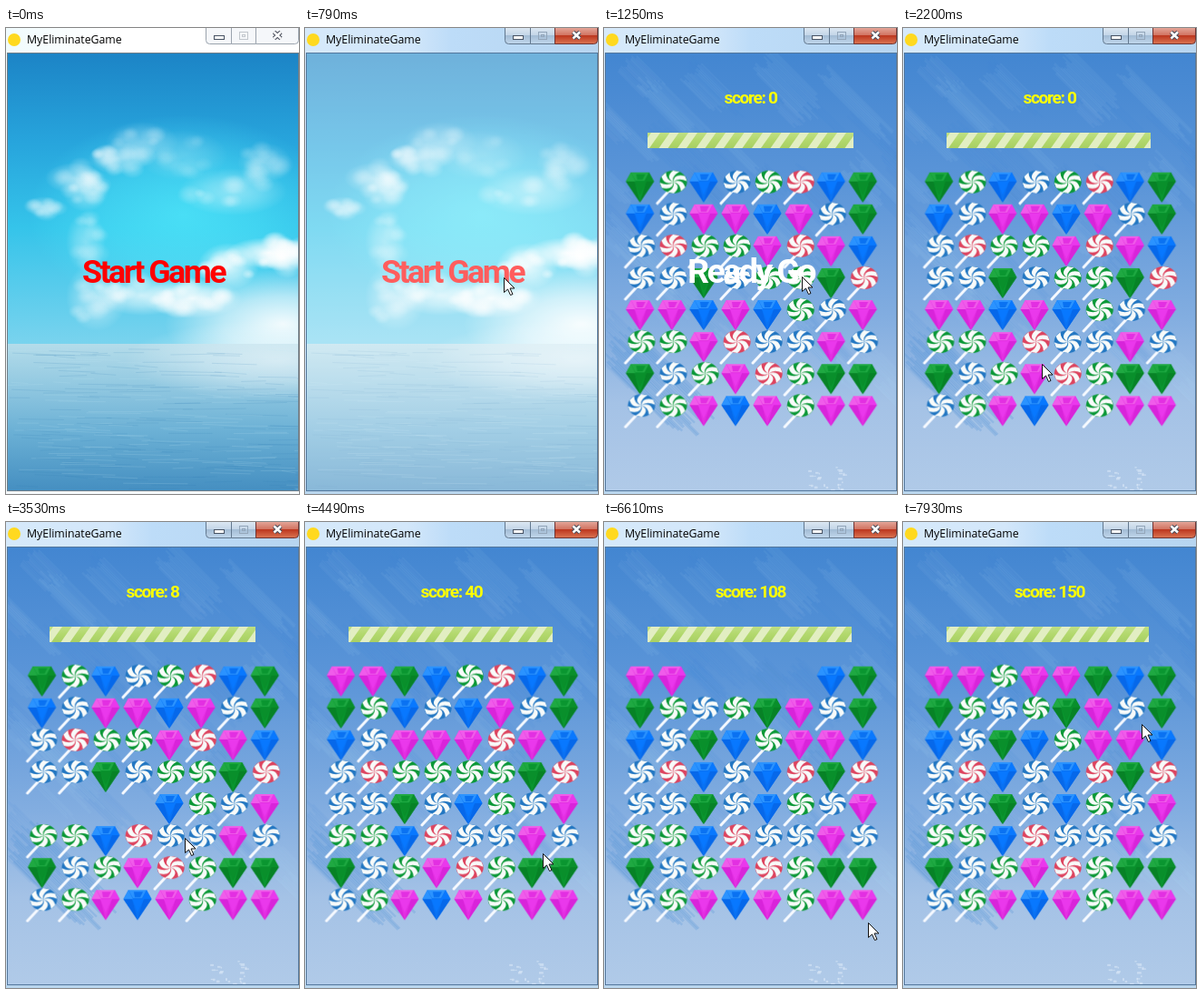
Animation of 323x512 px, one loop 8000 ms. Source, as an HTML page with a canvas:

```html
<!DOCTYPE html>
<html lang="en">
<head>
<meta charset="utf-8">
<title>MyEliminateGame</title>
<style>
html, body { margin: 0; width: 323px; height: 512px; overflow: hidden; }
canvas { display: block; }
</style>
</head>
<body>
<canvas id="stage" width="323" height="512"></canvas>
<script>
const W = 323, H = 512, LOOP = 8000;
const ctx = document.getElementById('stage').getContext('2d');
const clamp = (v, a = 0, b = 1) => Math.min(b, Math.max(a, v));
const part = (t, from, to) => clamp((t - from) / (to - from));
const mix = (a, b, k) => a + (b - a) * k;

function seeded(seed) {
  return () => (seed = (seed * 16807) % 2147483647) / 2147483647;
}

function layer(paint, w = W, h = H) {
  const c = document.createElement('canvas');
  c.width = w;
  c.height = h;
  paint(c.getContext('2d'));
  return c;
}

function shade(g, y0, y1, stops) {
  const fill = g.createLinearGradient(0, y0, 0, y1);
  stops.forEach(([at, color]) => fill.addColorStop(at, color));
  return fill;
}

function poly(g, color, ...pts) {
  g.fillStyle = color;
  g.beginPath();
  for (let i = 0; i < pts.length; i += 2) g.lineTo(pts[i], pts[i + 1]);
  g.closePath();
  g.fill();
}

function glow(g, x, y, rx, ry, alpha, rgb = '255,255,255') {
  g.save();
  g.translate(x, y);
  g.scale(rx, ry);
  const fill = g.createRadialGradient(0, 0, 0, 0, 0, 1);
  fill.addColorStop(0, `rgba(${rgb},${alpha})`);
  fill.addColorStop(0.5, `rgba(${rgb},${alpha * 0.6})`);
  fill.addColorStop(1, `rgba(${rgb},0)`);
  g.fillStyle = fill;
  g.fillRect(-1, -1, 2, 2);
  g.restore();
}

// Scenery
const clouds = [
  [42, 196, 22, 11, 0.4], [75, 165, 32, 17, 0.45], [88, 180, 25, 22, 0.4],
  [125, 143, 34, 18, 0.5], [150, 125, 40, 22, 0.3], [195, 140, 50, 28, 0.2],
  [250, 180, 60, 26, 0.4], [285, 148, 30, 22, 0.3], [88, 235, 22, 34, 0.35],
  [100, 295, 34, 38, 0.5], [150, 294, 50, 22, 0.7], [205, 297, 55, 22, 0.9],
  [245, 262, 34, 26, 0.8], [290, 247, 48, 17, 0.95], [310, 250, 30, 18, 0.8]
];

const sky = layer(g => {
  g.fillStyle = shade(g, 28, 347, [[0, '#1c84c6'], [0.3, '#27a4dc'], [0.6, '#35c4ea'], [1, '#79d3ee']]);
  g.fillRect(2, 28, 320, 320);
  glow(g, 195, 205, 170, 110, 0.75, '80,232,250');
  const rnd = seeded(11);
  clouds.forEach(([x, y, rx, ry, a]) => {
    glow(g, x, y, rx, ry, a);
    for (let i = 0; i < 9; i++) {
      const turn = rnd() * 6.28, far = 0.3 + rnd() * 0.5, size = 5 + rnd() * 8;
      glow(g, x + Math.cos(turn) * rx * far, y + Math.sin(turn) * ry * far, size * 1.3, size, a * 0.6);
    }
  });
  glow(g, 305, 325, 130, 60, 0.9);
  g.fillStyle = shade(g, 347, 508, [[0, '#b4dcea'], [0.25, '#96cbe2'], [0.6, '#6bb0d5'], [1, '#458fc1']]);
  g.fillRect(2, 347, 320, 161);
  glow(g, 300, 365, 170, 45, 0.55);
  g.lineWidth = 1;
  for (let i = 0; i < 240; i++) {
    const y = 350 + 157 * rnd(), x = rnd() * W, w = 15 + rnd() * 60;
    g.strokeStyle = rnd() < 0.5 ? 'rgba(45,120,175,.14)' : 'rgba(190,228,242,.16)';
    g.beginPath();
    g.moveTo(x, y);
    g.lineTo(x + w, y + (rnd() - 0.3) * 4);
    g.stroke();
  }
});

// A dry brush mark: parallel bristles running down to the right
function brush(g, rnd, x, y, len, width, color) {
  g.strokeStyle = color;
  for (let off = 0; off < width; off += 2) {
    const a = (rnd() - 0.5) * len * 0.25, b = len * (0.8 + rnd() * 0.3);
    g.lineWidth = 1.5 + rnd() * 2;
    g.beginPath();
    g.moveTo(x + off * 0.72 + a, y - off * 0.7 + a);
    g.lineTo(x + off * 0.72 + b, y - off * 0.7 + b);
    g.stroke();
  }
}

const meadow = layer(g => {
  g.fillStyle = shade(g, 28, 508, [[0, '#4386d1'], [0.3, '#5b95d8'], [0.6, '#82ade0'], [0.8, '#a4c2e6'], [1, '#b0cae8']]);
  g.fillRect(2, 28, 320, 480);
  const rnd = seeded(29);
  for (let i = 0; i < 45; i++) {
    const color = rnd() < 0.5 ? 'rgba(170,204,240,.07)' : 'rgba(60,125,205,.07)';
    brush(g, rnd, rnd() * 360 - 50, 30 + rnd() * 370, 20 + rnd() * 55, 6 + rnd() * 26, color);
  }
  brush(g, rnd, 0, 365, 85, 50, 'rgba(95,152,216,.3)');
  g.fillStyle = 'rgba(220,234,248,.6)';
  for (let i = 0; i < 26; i++) g.fillRect(225 + rnd() * 40, 482 + rnd() * 25, 1 + rnd() * 4, 1 + rnd() * 2);
});

// Game pieces
const gems = {
  G: ['#0a9630', '#1fa942', '#078226', '#098f2b'],
  B: ['#0a72f2', '#2b93ff', '#0668ea', '#0878ff'],
  P: ['#e32fe2', '#f05cea', '#d824da', '#ea38ec']
};
const candies = { g: '#0b9837', b: '#2377c2', r: '#dd445f' };

function gem(g, [base, light, dark, mid]) {
  poly(g, base, -10, -16, 10, -16, 15.5, -6, 0, 17, -15.5, -6);
  poly(g, light, -10, -16, -5, -6, -15.5, -6);
  poly(g, light, -10, -16, 10, -16, 5, -7, -5, -7);
  poly(g, mid, 10, -16, 15.5, -6, 5, -6);
  poly(g, dark, -15.5, -6, -6, -6, 0, 17);
  poly(g, dark, 15.5, -6, 7, -6, 0, 17);
  poly(g, mid, -6, -6, 7, -6, 0, 9);
  poly(g, base, -4, -14, 6, -14, 3, -8, -3, -8);
}

function candy(g, color) {
  g.strokeStyle = '#f7faff';
  g.lineWidth = 3;
  g.lineCap = 'round';
  g.beginPath();
  g.moveTo(-3, 4);
  g.lineTo(-16, 18);
  g.stroke();
  g.translate(1.7, -5.5);
  g.scale(15, 12.5);
  g.fillStyle = color;
  g.beginPath();
  g.arc(0, 0, 1, 0, 7);
  g.fill();
  g.clip();
  g.fillStyle = '#f8fbfa';
  for (let i = 0; i < 6; i++) {
    g.beginPath();
    g.moveTo(0, 0);
    g.quadraticCurveTo(0.65, -0.35, 0.88, 0.48);
    g.lineTo(0.55, 0.84);
    g.quadraticCurveTo(0.52, 0.12, 0, 0);
    g.fill();
    g.rotate(Math.PI / 3);
  }
}

const sprites = {};
for (const kind of 'GBPgbr') {
  sprites[kind] = layer(g => {
    g.translate(20, 20);
    gems[kind] ? gem(g, gems[kind]) : candy(g, candies[kind]);
  }, 40, 40);
}

// Board: every piece keeps its own list of row moves
const start = ['GgBbgrBG', 'BbPPBPbG', 'brggPrPB', 'bbGbggGr',
               'PPBPBgbP', 'ggPrbbPb', 'GbgPrgGG', 'bgPBPgPP'];
const rounds = [
  { at: 3300, gone: [[4, 0, 3]], col: 0, fresh: ['P', 'P', 'G', 'B'] },
  { at: 4660, gone: [[2, 2, 4], [3, 2, 5]], col: 2, fresh: ['br', 'gr', 'Gr', 'P'] },
  { at: 5950, gone: [[1, 2, 5]], col: 2, fresh: ['g', 'P', 'P', 'G'] }
];
const SHRINK = 220, FALL = 250, FALL_END = 540, GROW = 700, GROW_END = 980;
const NEVER = 1e6;

const pieces = [];
function addPiece(kind, col, row, born) {
  const p = { kind, col, row, born, dies: NEVER, moves: [] };
  pieces.push(p);
  return p;
}
function moveTo(p, row, from, to) {
  if (p.row === row) return;
  p.moves.push({ a: p.row, b: row, from, to });
  p.row = row;
}

const columns = [...start[0]].map((_, c) => start.map((line, r) => addPiece(line[c], c, r, -1000)));
const swap = columns[2];
[swap[4], swap[5]] = [swap[5], swap[4]];
moveTo(swap[4], 4, 3090, 3290);
moveTo(swap[5], 5, 3090, 3290);

for (const { at, gone, col, fresh } of rounds) {
  for (const [row, c0, c1] of gone) {
    for (let c = c0; c <= c1; c++) columns[c][row].dies = at;
  }
  fresh.forEach((kinds, i) => {
    const c = col + i;
    const kept = columns[c].filter(p => p.dies === NEVER);
    kept.forEach((p, k) => moveTo(p, k + kinds.length, at + FALL, at + FALL_END));
    columns[c] = [...kinds].map((k, r) => addPiece(k, c, r, at + GROW)).concat(kept);
  });
}

function drawPiece(p, t) {
  const size = part(t, p.born, p.born + GROW_END - GROW) * (1 - part(t, p.dies, p.dies + SHRINK));
  if (size <= 0) return;
  let row = p.moves.length ? p.moves[0].a : p.row;
  for (const m of p.moves) if (t >= m.from) row = mix(m.a, m.b, part(t, m.from, m.to));
  const x = 39.6 + p.col * 35.1, y = 174.6 + row * 35.1, s = 40 * size;
  ctx.drawImage(sprites[p.kind], x - s / 2, y - s / 2, s, s);
}

// Lettering: tight bold type, sized so that a sample word has the given width
const TIGHT = -0.07;
function face(text, width) {
  const font = size => `bold ${size}px Roboto, "Open Sans", sans-serif`;
  ctx.font = font(100);
  ctx.letterSpacing = 100 * TIGHT + 'px';
  const size = 100 * width / ctx.measureText(text).width;
  return { font: font(size.toFixed(1)), spacing: (size * TIGHT).toFixed(2) + 'px' };
}
const startFace = face('Start Game', 157);
const readyFace = face('Ready Go', 140);
const scoreFace = face('score: 0', 58);
const titleFace = { font: '12.3px "Open Sans", "Noto Sans", sans-serif', spacing: '0px' };

function label(text, { font, spacing }, color, x, y, align = 'center') {
  ctx.font = font;
  ctx.letterSpacing = spacing;
  ctx.fillStyle = color;
  ctx.textAlign = align;
  ctx.fillText(text, x, y);
}

// Window chrome
function button(x, w, fill, edge, radii) {
  ctx.beginPath();
  ctx.roundRect(x + 0.5, -2.5, w, 20, radii);
  ctx.fillStyle = fill;
  ctx.fill();
  ctx.strokeStyle = edge;
  ctx.lineWidth = 1;
  ctx.stroke();
}

function cross(color, width) {
  ctx.strokeStyle = color;
  ctx.lineWidth = width;
  ctx.beginPath();
  ctx.moveTo(295.5, 4.5);
  ctx.lineTo(303, 11.5);
  ctx.moveTo(303, 4.5);
  ctx.lineTo(295.5, 11.5);
  ctx.stroke();
}

function drawWindow(active) {
  const back = ctx.createLinearGradient(0, 0, W, 0);
  back.addColorStop(0, active ? '#d6e9fa' : '#f0fbfd');
  back.addColorStop(0.35, active ? '#d3e7fa' : '#ffffff');
  back.addColorStop(0.5, active ? '#bddcf8' : '#ffffff');
  back.addColorStop(1, active ? '#b7d5f0' : '#ffffff');
  ctx.fillStyle = back;
  ctx.fillRect(0, 0, W, H);
  ctx.fillStyle = active ? '#b9d6ee' : '#f4f8fb';
  ctx.fillRect(0, 509, W, 3);
  ctx.strokeStyle = active ? '#53779c' : '#6f7d88';
  ctx.lineWidth = 1;
  ctx.strokeRect(1.5, 27.5, 321, 481);

  ctx.fillStyle = '#ffd91f';
  ctx.beginPath();
  ctx.arc(9, 13, 7, 0, 7);
  ctx.fill();
  label('MyEliminateGame', titleFace, '#000', 23, 17.3, 'left');

  const edge = active ? '#62788f' : '#9aa3ad';
  const glass = active ? shade(ctx, 0, 17, [[0, '#dbe7f2'], [0.48, '#c3d5e7'], [0.5, '#a4bdd6'], [1, '#bfd5ea']]) : '#f5f7fa';
  const red = active ? shade(ctx, 0, 17, [[0, '#e3a497'], [0.45, '#d27563'], [0.5, '#bd3820'], [1, '#d9714f']]) : '#f5f7fa';
  button(220, 28, glass, edge, [0, 0, 0, 4]);
  button(248, 27, glass, edge, 0);
  button(275, 47, red, active ? '#6e3434' : edge, [0, 0, 4, 0]);
  ctx.fillStyle = '#fff';
  ctx.strokeStyle = '#475263';
  ctx.fillRect(229.5, 8.5, 11, 4);
  ctx.strokeRect(229.5, 8.5, 11, 4);
  ctx.strokeStyle = active ? '#93a6ba' : '#c2c7cd';
  ctx.strokeRect(257.5, 4.5, 9, 8);
  ctx.strokeRect(260.5, 7.5, 3, 2);
  cross('#4b4f5c', 4.6);
  cross('#fff', 2.4);
}

function drawBar(t) {
  const resets = [1500, ...rounds.map(r => r.at)].filter(at => at <= t);
  const ticks = at => Math.floor((at - 590) / 1000);
  const lost = resets.length ? ticks(t) - ticks(resets[resets.length - 1]) : 0;
  ctx.save();
  ctx.beginPath();
  ctx.rect(48, 115, 227 - 2 * lost, 17);
  ctx.clip();
  ctx.fillStyle = shade(ctx, 115, 132, [[0, '#bfdf84'], [0.5, '#b2d86c'], [1, '#a8cf64']]);
  ctx.fillRect(48, 115, 227, 17);
  for (let x = 40; x < 290; x += 20.5) poly(ctx, '#e2eec2', x, 132, x + 10, 132, x + 22, 115, x + 12, 115);
  ctx.restore();
}

function drawGame(t) {
  ctx.drawImage(meadow, 0, 0);
  const gain = (from, most) => clamp((t - from) * 0.035, 0, most);
  const score = Math.floor(gain(3300, 40) + gain(4660, 110));
  label('score: ' + score, scoreFace, '#ffff00', 161.5, 82.5);
  drawBar(t);
  pieces.forEach(p => drawPiece(p, t));
  const away = part(t, 1480, 1980);
  if (away < 1) label('Ready Go', readyFace, '#fff', 162 + 235 * away * away, 280);
}

// Pointer: time, x, y
const path = [
  [300, 310, 420], [620, 220, 276], [950, 218, 273], [1480, 218, 273], [2200, 153, 369],
  [2280, 135, 364], [2420, 123, 353], [2580, 123, 352], [2950, 111, 344], [3090, 112, 338],
  [3200, 113, 312], [3890, 289, 386], [3970, 289, 386], [4490, 262, 364], [5290, 269, 362],
  [5590, 302, 471], [6000, 307, 468], [6610, 291, 440], [7350, 289, 434], [7930, 263, 222]
];

function drawPointer(t) {
  if (t < path[0][0]) return;
  let i = 0;
  while (i < path.length - 2 && t >= path[i + 1][0]) i++;
  const [t0, x0, y0] = path[i], [t1, x1, y1] = path[i + 1];
  const k = part(t, t0, t1);
  ctx.save();
  ctx.translate(Math.round(mix(x0, x1, k)) + 0.5, Math.round(mix(y0, y1, k)) + 0.5);
  poly(ctx, '#fff', 0, 0, 0, 16, 4, 12.5, 7, 19, 9.5, 18, 6.5, 11.5, 11.5, 11.5);
  ctx.strokeStyle = '#111';
  ctx.lineWidth = 1;
  ctx.stroke();
  ctx.restore();
}

function draw(t) {
  drawWindow(t >= 620);
  ctx.save();
  ctx.beginPath();
  ctx.rect(2, 28, 320, 480);
  ctx.clip();
  if (t < 970) {
    ctx.drawImage(sky, 0, 0);
    label('Start Game', startFace, '#ff0000', 162.5, 280);
  } else {
    drawGame(t);
  }
  const white = t < 970 ? part(t, 700, 950) : 1 - part(t, 990, 1250);
  ctx.fillStyle = `rgba(255,255,255,${white})`;
  ctx.fillRect(2, 28, 320, 480);
  ctx.restore();
  drawPointer(t);
}

const began = performance.now();
function tick() {
  draw((performance.now() - began) % LOOP);
  requestAnimationFrame(tick);
}
tick();
</script>
</body>
</html>
```
